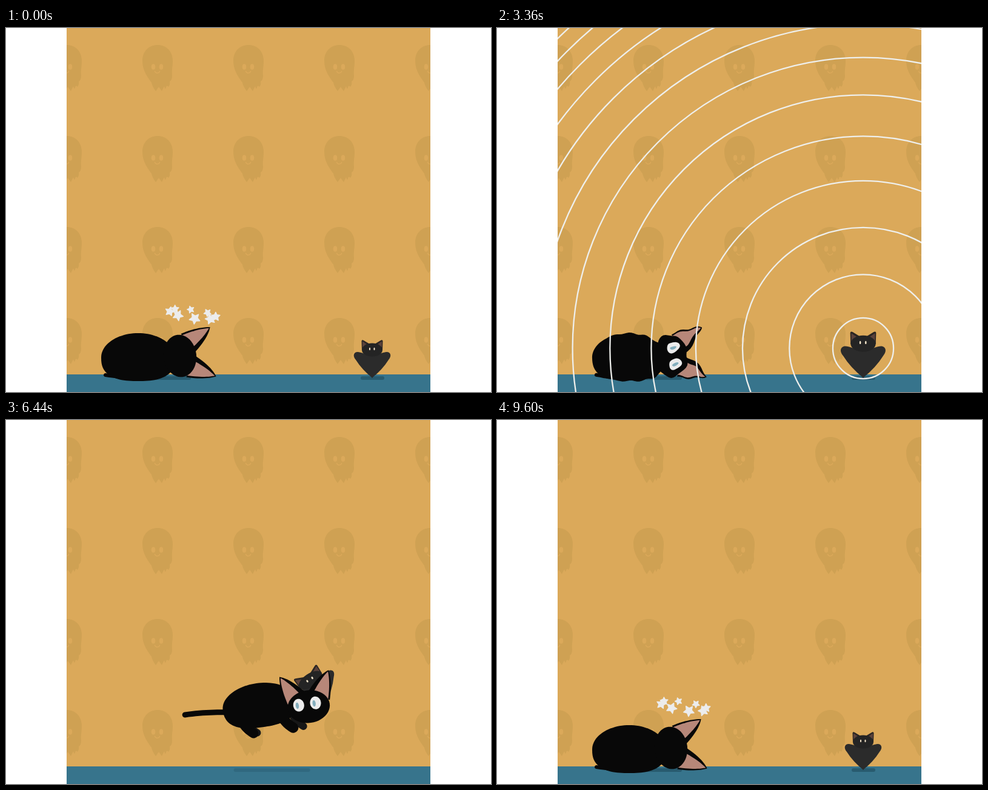
Recreate the animation shown at these times as an HTML page with a canvas. Size 800 px wide and 600 px high, loop 9640 ms.

```html
<!DOCTYPE html>
<html lang="en">
<head>
<meta charset="utf-8">
<title>Cat and bat</title>
<style>
html, body { margin: 0; width: 100%; height: 100%; overflow: hidden; background: #fff; }
canvas { display: block; width: 800px; height: 600px; }
</style>
</head>
<body>
<canvas id="stage" width="800" height="600"></canvas>
<script>
const g = document.getElementById('stage').getContext('2d');
const LOOP = 9640, STEP = 40, TAU = Math.PI * 2, DEG = Math.PI / 180;
const BLACK = '#080808', FAR = '#171717', PINK = '#b78779', WALL = '#dba95a', WHITE = '#ececec';

// ---------- time and number helpers ----------
const clamp = (v, a = 0, b = 1) => Math.min(b, Math.max(a, v));
const mix = (a, b, k) => a + (b - a) * k;

// 0 before a, 1 after b, eased between
function ramp(t, a, b) {
  const k = clamp((t - a) / (b - a));
  return k * k * (3 - 2 * k);
}

// 0 to 1 and back to 0 between a and b
function hop(t, a, b) {
  const k = clamp((t - a) / (b - a));
  return 4 * k * (1 - k);
}

function blend(a, b, k) {
  if (Array.isArray(a)) return a.map((v, i) => blend(v, b[i], k));
  return mix(a, b, k);
}

// ---------- outlines ----------
function turn(x, y, deg, ox, oy) {
  const c = Math.cos(deg * DEG), s = Math.sin(deg * DEG);
  return [ox + x * c - y * s, oy + x * s + y * c];
}

function oval(x, y, rx, ry, lid = -1) {
  return Array.from({ length: 48 }, (_, i) => {
    const a = i / 48 * TAU;
    return [x + rx * Math.cos(a), y + ry * Math.max(lid, Math.sin(a))];
  });
}

// Round on top, squarer below
function torso(x, y, rx, up, down) {
  return Array.from({ length: 96 }, (_, i) => {
    const c = Math.cos(i / 96 * TAU), top = i >= 48, n = top ? 2 : 2.6;
    const h = Math.max(0, 1 - Math.abs(c) ** n) ** (1 / n);
    return [x + rx * c, y + (top ? -up : down) * h];
  });
}

function curve(x1, y1, cx, cy, x2, y2) {
  return Array.from({ length: 13 }, (_, i) => {
    const u = i / 12, v = 1 - u;
    return [v * v * x1 + 2 * u * v * cx + u * u * x2, v * v * y1 + 2 * u * v * cy + u * u * y2];
  });
}

function trace(pts, map) {
  g.beginPath();
  pts.forEach(p => g.lineTo(...map(p)));
}

function fill(pts, map, color) {
  trace(pts, map);
  g.closePath();
  g.fillStyle = color;
  g.fill();
}

function limb(pts, width, map, color) {
  trace(pts, map);
  g.strokeStyle = color;
  g.lineWidth = width;
  g.stroke();
}

// ---------- cat ----------
// body: centre, half width, height above and below; tail: start, end, sag, width
// feet: hind x, front x, ground y, stride, thigh width; head: centre, angle, look
const LYING = { body: [218, 543, 61, 40, 39], tail: [164, 572, 243, 576, 4, 6], feet: [180, 235, 560, 0, 18], head: [287, 540.5, 83, 0], shade: [245, 60] };
const CROUCH = { body: [218, 522, 60, 42, 31], tail: [168, 573, 246, 574, 8, 7], feet: [177, 241, 563, 0, 27], head: [291, 541, 0, 3.5], shade: [176, 123] };
const PROWL = { body: [219, 528, 61, 36, 37], tail: [95, 527, 166, 533, -3, 9], feet: [187, 253, 573, 16, 16], head: [299, 542, 0, -2], shade: [175, 126] };
const POSES = [LYING, CROUCH, PROWL, LYING];

function poseAt(t) {
  const p = ramp(t, 4960, 5200) + ramp(t, 5960, 6120) + ramp(t, 8200, 8800);
  const i = Math.min(2, Math.floor(p)), out = {};
  for (const key in LYING) out[key] = blend(POSES[i][key], POSES[i + 1][key], p - i);
  return out;
}

const EAR = [...curve(-36, -6, -44, -34, -41, -55), ...curve(-41, -55, -24, -50, -2, -24)];
const EAR_IN = [...curve(-33, -6, -41, -34, -39.5, -53), ...curve(-39.5, -53, -26, -43, -11, -22)];

function drawHead([hx, hy, angle, look], lid, map) {
  const local = side => ([x, y]) => map(turn(x * side, y, angle, hx, hy));
  for (const side of [-1, 1]) {
    fill(EAR, local(side), BLACK);
    fill(EAR_IN, local(side), PINK);
  }
  fill(oval(0, 0, 35, 27), local(1), BLACK);
  if (lid >= 1) return;
  for (const x of [-14, 14]) {
    fill(oval(x + look, -4.5, 9, 10.5, lid), local(1), WHITE);
    fill(oval(x + look * 2.2, -4, 2.6, 5.2, lid), local(1), '#84aebd');
  }
}

function drawCat(t) {
  const { body, tail, feet, head, shade } = poseAt(t);
  const dx = 318 * (ramp(t, 6040, 6720) - ramp(t, 7640, 8440));
  const dy = -60 * hop(t, 6160, 6720) - 430 * hop(t, 7680, 9040) - 14 * hop(t, 9040, 9240);
  const rot = -8 * hop(t, 6160, 6720) + 25 * hop(t, 7680, 8300) - 30 * hop(t, 8200, 9000);
  const lid = 1 - 2 * ramp(t, 1960, 2200) + ramp(t, 4400, 4720) - ramp(t, 5960, 6080) + 2 * ramp(t, 8400, 8560);
  const shiver = 1.8 * ramp(t, 1480, 2300) * (1 - ramp(t, 3200, 3880));

  const map = ([x, y]) => {
    const [px, py] = turn(x - 230, y - 540, rot, 230 + dx, 540 + dy);
    const k = shiver * clamp((px - 150) / 100);
    return [px + k * Math.sin(py * .21 + t / 55), py + k * Math.sin(px * .23 + t / 55)];
  };

  const [hind, front, ground, stride, thigh] = feet;
  const leg = (x, lift, width, color) =>
    limb(curve(x, 546, x, 560, x + stride, ground - lift), width, map, color);

  bar(shade[0] + dx, shade[1], 1 + dy / 110);
  leg(hind + 22 - stride, 0, 12, FAR);
  leg(front + 17, 0, 12, FAR);
  leg(hind, 0, thigh, BLACK);
  leg(front, 0, 17, BLACK);
  const [x1, y1, x2, y2, sag, width] = tail;
  limb(curve(x1, y1, (x1 + x2) / 2, (y1 + y2) / 2 + sag, x2, y2), width, map, BLACK);
  fill(torso(...body), map, BLACK);
  drawHead(head, lid, map);
}

// ---------- bat ----------
function shape(path, color) {
  g.fillStyle = color;
  g.fill(new Path2D(path));
}

function ellipse(x, y, rx, ry, color) {
  g.beginPath();
  g.ellipse(x, y, rx, ry, 0, 0, TAU);
  g.fillStyle = color;
  g.fill();
}

function mirrored(paint) {
  for (const side of [-1, 1]) {
    g.save();
    g.scale(side, 1);
    paint();
    g.restore();
  }
}

function drawBat(t) {
  const fly = ramp(t, 6120, 7280) - ramp(t, 8040, 8960);
  const x = mix(604, 195.5, fly), y = mix(577, -10, fly);
  const laugh = ramp(t, 3840, 3960) - ramp(t, 5960, 6080);
  const mouth = ramp(t, 1400, 1520) - ramp(t, 3240, 3340) + .3 * laugh;
  const size = 1 - .05 * hop(t, 1080, 1480) + .25 * ramp(t, 1400, 1540)
    - .03 * ramp(t, 3200, 3360) - .22 * ramp(t, 3360, 3680);
  const giggle = laugh * (.03 + .02 * Math.cos((t - 5360) / 160 * Math.PI));
  const flap = hop(fly, 0, 1) * (.2 + .3 * Math.sin(t / 160 * TAU));

  bar(x - 19, 39, 1 - (577 - y) / 90);
  g.save();
  g.translate(x, y);
  g.rotate(-180 * fly * DEG);
  g.scale(size + giggle + flap, size - giggle);
  mirrored(() => {
    shape('M-.5 0Q17-14 27-30C33-37 30-43 24-43C18-43 12-38-.5-39Z', '#2b2b2b');
    shape('M17-46L17.5-61Q17-64 14-62L4-56L7-46Z', '#2a2523');
    shape('M16-47L16-60.5L7-54.5L9-47Z', '#5b423b');
  });
  ellipse(0, -46.5, 17, 11, '#242424');
  const calm = laugh < .5;
  for (const ex of [-4, 3.5]) ellipse(ex, -48, calm ? 1.1 : 2, calm ? 2.2 : .7, '#f0e2c8');
  if (mouth > 0) {
    ellipse(0, -41, 10 + 1.5 * mouth, 4.5 * mouth, '#76451f');
    mirrored(() => shape('M5-43L8-43L6.5-38.5Z', '#f2f2f2'));
  }
  g.restore();
}

// ---------- scenery ----------
function bar(x, width, alpha) {
  g.globalAlpha = clamp(alpha);
  g.fillStyle = '#285b6f';
  g.beginPath();
  g.roundRect(x, 574, width, 6, 3);
  g.fill();
  g.globalAlpha = 1;
}

function drawGhost(x, y) {
  g.save();
  g.translate(x, y);
  shape('M-25 26C-25 10-14 0 0 0S25 10 25 26C25 36 23 42 24 50Q24 58 20 60Q21 66 18 69Q15 65 14 70Q13 75 11 68L7 76L2 69L-3 76Q-9 68-10 62C-17 52-25 42-25 26Z', '#cfa153');
  for (const ex of [-7, 6]) ellipse(ex, 36, 3.3, 4.8, WALL);
  g.strokeStyle = WALL;
  g.lineWidth = 1.6;
  g.beginPath();
  g.arc(-.5, 42, 4.2, .35, Math.PI - .35);
  g.stroke();
  g.restore();
}

function drawRoom() {
  g.fillStyle = WALL;
  g.fillRect(100, 0, 600, 600);
  for (let y = 28; y < 600; y += 150)
    for (let x = 100; x <= 700; x += 150) drawGhost(x, y);
  g.fillStyle = '#37748c';
  g.fillRect(100, 571, 600, 29);
}

// ---------- stars and rings ----------
function star(x, y, r, rot) {
  g.beginPath();
  for (let i = 0; i < 10; i++) {
    const a = rot + i * Math.PI / 5, q = i % 2 ? r * .5 : r;
    g.lineTo(x + q * Math.sin(a), y - q * Math.cos(a));
  }
  g.closePath();
  g.fill();
  g.stroke();
}

function drawStars(t) {
  const scale = 1 - ramp(t, 1840, 2040) + ramp(t, 9120, 9320);
  if (scale <= 0) return;
  const time = t > LOOP / 2 ? t - LOOP : t;
  const burst = ramp(time, 1440, 1760), copies = burst > 0 ? 5 : 1;
  const rx = mix(38, 51, burst), cx = mix(308, 293, burst);
  g.fillStyle = g.strokeStyle = WHITE;
  g.lineWidth = 1.4;
  for (let i = 0; i < 8; i++) {
    for (let c = 0; c < copies; c++) {
      const a = (time / 5 - 5 + i * 45 - c * 9 * burst) * DEG;
      const x = rx * Math.cos(a), s = Math.sin(a);
      star(cx + x, 471.5 + x * .13 + 7 * s, mix(7.6 + 1.7 * s, 3.6 + .8 * s, burst) * scale, i + time / 900);
    }
  }
}

// One new ring per step; each slows down with age while the whole set swells
function drawRings(t) {
  const oldest = Math.min(21, (t - 1560) / STEP), newest = Math.max(0, (t - 3360) / STEP);
  const swell = 1 + (t - 1760) * .000154;
  g.strokeStyle = '#eeefec';
  g.lineWidth = 2.3;
  for (let age = newest; age <= oldest; age++) {
    const r = 668 * (1 - Math.exp(-.062 * (age + 1) ** 1.35));
    g.globalAlpha = clamp(1 - (age - 13) * .13);
    g.beginPath();
    g.arc(604, 528, r * swell, 0, TAU);
    g.stroke();
  }
  g.globalAlpha = 1;
}

function draw(t) {
  g.fillStyle = '#fff';
  g.fillRect(0, 0, 800, 600);
  g.save();
  g.beginPath();
  g.rect(100, 0, 600, 600);
  g.clip();
  g.lineCap = g.lineJoin = 'round';
  drawRoom();
  drawBat(t);
  drawCat(t);
  drawStars(t);
  drawRings(t);
  g.restore();
}

const start = performance.now();
function tick() {
  const t = (performance.now() - start) % LOOP;
  draw(Math.floor(t / STEP) * STEP);
  requestAnimationFrame(tick);
}
tick();
</script>
</body>
</html>
```
